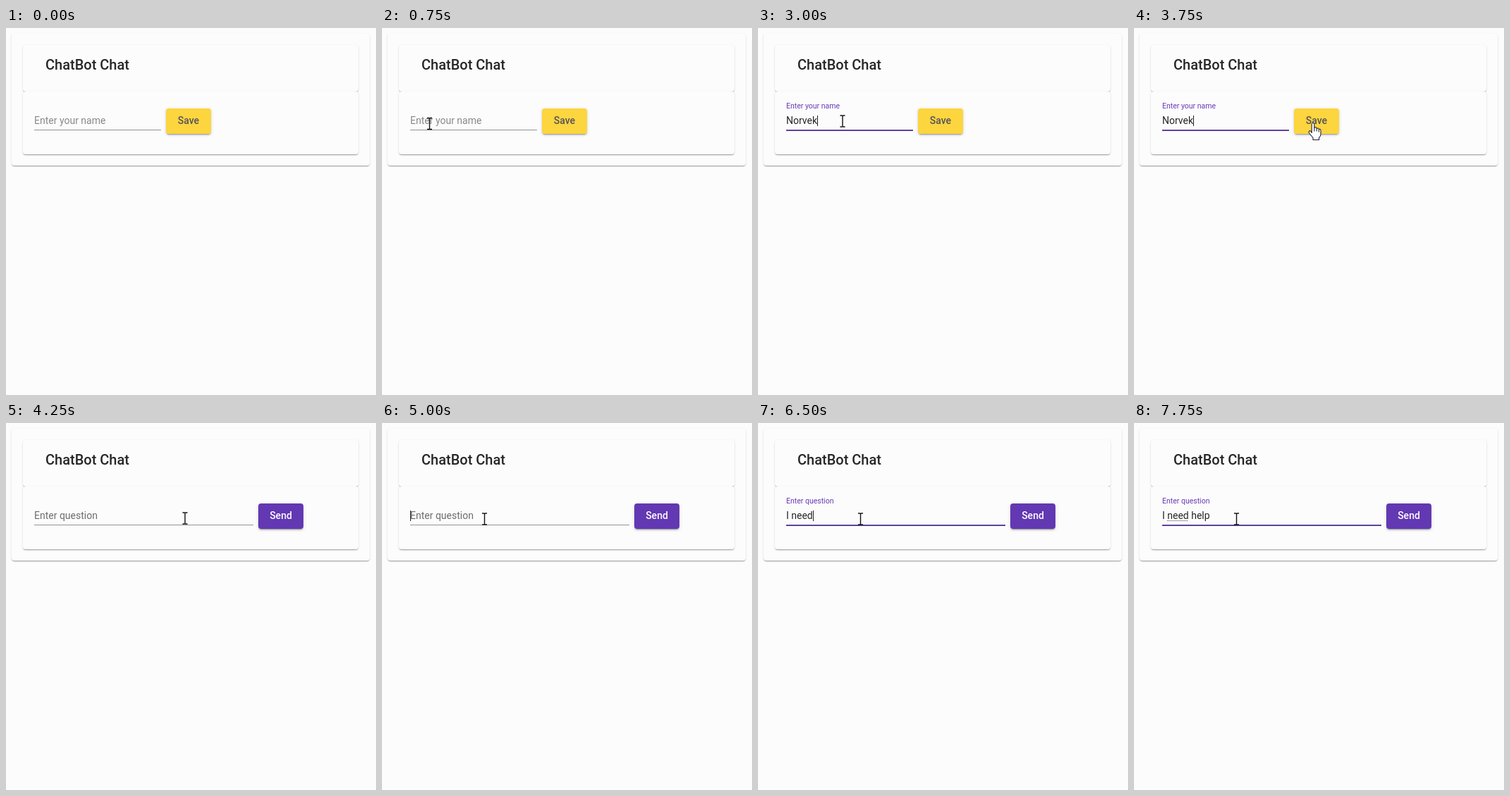
Write an HTML page that moves like this. It is 525 by 520 pixels and loops after 8 s.

```html
<!DOCTYPE html>
<html lang="en">
<head>
<meta charset="utf-8">
<title>ChatBot Chat</title>
<style>
  html, body { margin: 0; width: 100%; height: 100%; overflow: hidden; background: #fcfcfc; }
  body { position: relative; font: 14px/20px Roboto, sans-serif; color: #262626; }
  body div, svg { position: absolute; white-space: pre; }
  .card {
    background: #fcfcfc; border-radius: 4px;
    box-shadow: 0 2px 1px -1px rgba(0,0,0,.2), 0 1px 1px rgba(0,0,0,.14), 0 1px 3px rgba(0,0,0,.12);
  }
  #title { left: 56px; top: 40px; font-size: 20px; line-height: 24px; font-weight: 500; }
  #label { left: 40px; }
  #label.resting { top: 121px; }
  #label.floating { top: 104px; font-size: 10.5px; line-height: 14px; }
  #value { left: 40px; top: 121px; }
  #value i {
    display: inline-block; width: 1px; height: 15px; margin-right: -1px;
    vertical-align: -3px; background: #222;
  }
  #value u { text-decoration: underline dotted 1px #444; text-underline-offset: 2px; }
  #line { left: 40px; top: 144px; }
  #button {
    top: 114px; width: 64px; height: 36px; border-radius: 4px;
    line-height: 35px; font-weight: 500; text-align: center;
    box-shadow: 0 3px 1px -2px rgba(0,0,0,.2), 0 2px 2px rgba(0,0,0,.14), 0 1px 5px rgba(0,0,0,.12);
  }
  #cursor { left: 0; top: 0; overflow: visible; }
</style>
</head>
<body>
<div class="card" style="left:8px;top:8px;width:508px;height:187px"></div>
<div class="card" style="left:24px;top:24px;width:476px;height:66px"></div>
<div class="card" style="left:24px;top:90px;width:476px;height:89px"></div>
<div id="title">ChatBot Chat</div>
<div id="label"></div>
<div id="value"></div>
<div id="line"></div>
<div id="button"></div>
<svg id="cursor" width="1" height="1"><path id="shape" stroke-linejoin="round"/></svg>
<script>
const LOOP = 8000, STEP = 250;
const PURPLE = '#673ab7';
const $ = id => document.getElementById(id);

const forms = {
  name: { label: 'Enter your name', hint: '#888', width: 180, button: 'Save', left: 227, fill: '#fcd53f', ink: '#57525c' },
  question: { label: 'Enter question', hint: '#6c6c6c', width: 311, button: 'Send', left: 358, fill: '#6338b3', ink: '#fff' }
};

// Each shape is drawn around its hot spot.
const shapes = {
  beam: { d: 'M-3.5-8H-1Q0-8 0-7Q0-8 1-8H3.5M0-7V7M-3.5 8H-1Q0 8 0 7Q0 8 1 8H3.5', fill: 'none', stroke: '#111', width: 1.4 },
  arrow: { d: 'M0 0V16L4 12.5L6.5 18.5L9 17.5L6.5 11.5H11.5Z', fill: '#fff', stroke: '#111', width: 1 },
  hand: {
    d: 'M-1.8 12V2Q-1.8 0 0 0T1.8 2V8Q2-.0 2 7Q5 5 5.2 8Q8 6.500 8.300 9Q11 8 11 11V16Q11 19 8.500 21V24H0V21L-5.500 14.500Q-6.500 12-4.500 11Q-3 11-1.800 14ZM1.800 8V12M5.200 8V12M8.300 9V13',
    fill: '#fff', stroke: '#222038', width: 1.1
  }
};

// [time, shape, x, y]
const pointer = [
  [250, 'arrow', 286, 34], [500, 'arrow', 150, 95], [750, 'beam', 67.5, 135.5],
  [1000, 'beam', 68.5, 134], [3000, 'beam', 120, 132], [3250, 'arrow', 190, 82],
  [3500, 'hand', 246, 122], [3750, 'hand', 254, 134.5], [4250, 'beam', 254, 135],
  [4500, 'arrow', 330, 347], [4750, 'arrow', 240, 240], [5000, 'beam', 145.5, 136]
];

// [time, text]; typing restarts the caret blink.
const nameKeys = [[1000, ''], ...[...'Norvek'].map((_, i, a) => [1500 + i * STEP, a.slice(0, i + 1).join('')])];
const questionKeys = [
  [5000, ''], [5500, 'I'], [5750, 'I n'], [6000, 'I ne'], [6250, 'I nee'],
  [6500, 'I need'], [6750, 'I need h'], [7000, 'I need hel'], [7250, 'I need help']
];

const latest = (keys, t) => keys.filter(key => key[0] <= t).pop();

function drawForm(t) {
  const asking = t >= 4250;
  const form = asking ? forms.question : forms.name;
  const [typedAt, text] = latest(asking ? questionKeys : nameKeys, t) || [0, ''];
  const focused = asking ? t >= 5000 : t >= 1000 && t < 4000;
  const floating = t >= (asking ? 5250 : 1250);
  const active = focused && floating;
  const caret = focused && (t - typedAt) % 1000 < 500;

  $('label').textContent = form.label;
  $('label').className = floating ? 'floating' : 'resting';
  $('label').style.color = active ? PURPLE : form.hint;

  const marked = t >= 7500 ? text.replace('need', '<u>need</u>') : text;
  $('value').innerHTML = marked + (caret ? '<i></i>' : '');

  Object.assign($('line').style, {
    width: form.width + 'px',
    height: active ? '2px' : '1px',
    background: active ? '#60409f' : '#949494'
  });
  $('button').textContent = form.button;
  Object.assign($('button').style, { left: form.left + 'px', background: form.fill, color: form.ink });
}

function drawPointer(t) {
  const spot = latest(pointer, t);
  $('cursor').style.display = spot ? '' : 'none';
  if (!spot) return;
  const [, name, x, y] = spot;
  const { d, fill, stroke, width } = shapes[name];
  const attributes = { d, fill, stroke, 'stroke-width': width, transform: `translate(${x} ${y})` };
  for (const key in attributes) $('shape').setAttribute(key, attributes[key]);
}

let shown = -1;
function render() {
  const t = Math.floor(performance.now() % LOOP / STEP) * STEP;
  if (t !== shown) {
    drawForm(t);
    drawPointer(t);
    shown = t;
  }
  requestAnimationFrame(render);
}
render();
</script>
</body>
</html>
```
